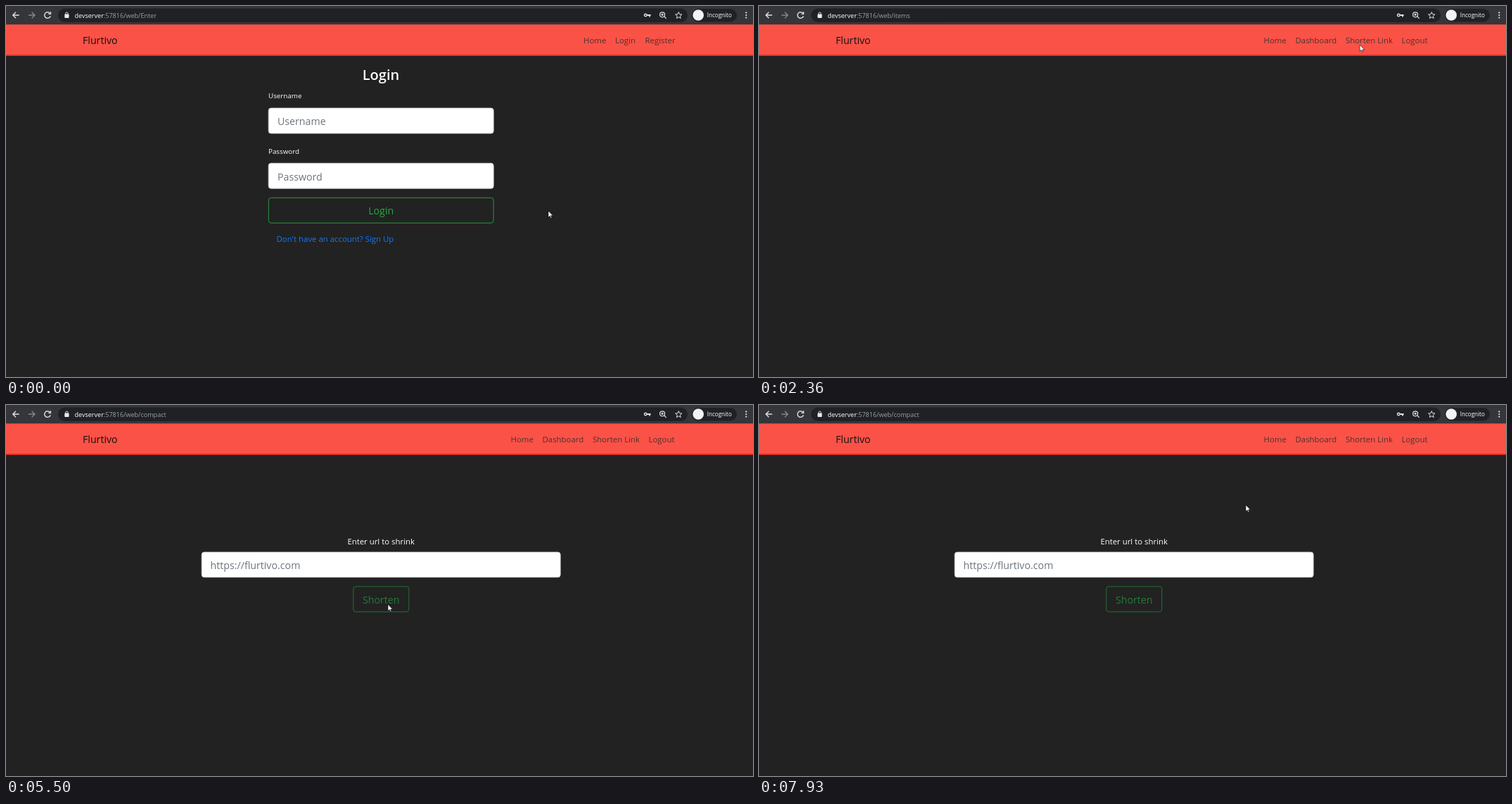
Write an HTML page that moves like this. It is 1062 px wide and 527 px high and loops after 8 s.

```html
<!DOCTYPE html>
<html lang="en">
<head>
<meta charset="utf-8">
<title>Link shortener demo</title>
<style>
  html, body { margin: 0; width: 100%; height: 100%; overflow: hidden; background: #222; }
  svg { display: block; width: 100vw; height: 100vh; }
  text { font: 11.4px "Open Sans", "Noto Sans", sans-serif; fill: #fff; white-space: pre; }
  .large { font-size: 14.2px; }
  .label { font-size: 9.8px; }
  .mid { text-anchor: middle; }
  .nav text { fill: #4b3230; }
  .hint { fill: #6c757d; }
  .field { fill: #fff; stroke: #ced4da; stroke-width: .8; }
  .glow { fill: none; stroke: #007bff; stroke-opacity: .5; stroke-width: 3; }
  .icon { fill: none; stroke: #dfe1e5; stroke-width: 1.4; }
</style>
</head>
<body>
<svg viewBox="0 0 1062 527">
  <rect width="1062" height="527" fill="#222"/>

  <rect y="26" width="1062" height="45" fill="#fb5247"/>
  <rect y="69.3" width="1062" height="1.7" fill="#e32a20"/>
  <text class="large" x="109" y="54" style="fill:#161010">Flurtivo</text>

  <g id="login">
    <g class="nav">
      <text x="821" y="53">Home</text><text x="866" y="53">Login</text><text x="908.5" y="53">Register</text>
    </g>
    <text class="mid" x="533" y="105" style="font-size:20px;font-weight:600">Login</text>
    <text class="label" x="373" y="131">Username</text>
    <text class="label" x="373" y="209.5">Password</text>
    <rect id="userGlow" class="glow" x="372" y="143.5" width="322" height="39" rx="4.5"/>
    <rect class="field" x="373.2" y="145" width="320" height="36" rx="3.6"/>
    <rect class="field" x="373.2" y="223.3" width="320" height="36" rx="3.6"/>
    <g id="emptyForm">
      <text class="large hint" x="386" y="169.3">Username</text>
      <text class="large hint" x="386" y="247.5">Password</text>
    </g>
    <g id="filledForm">
      <rect x="373.5" y="145.3" width="319.4" height="35.4" rx="3.6" fill="#e8f0fe"/>
      <rect x="373.5" y="223.6" width="319.4" height="35.4" rx="3.6" fill="#e8f0fe"/>
      <text class="large" x="386" y="169.3" style="fill:#000">NewGuest</text>
      <path d="M389.3 242.5H433.5" stroke="#000" stroke-width="4.6" stroke-linecap="round" stroke-dasharray="0 6.2"/>
    </g>
    <rect id="loginRing" x="372" y="271.2" width="322.4" height="38" rx="4.5" fill="none" stroke="#28a745" stroke-opacity=".5" stroke-width="3.2"/>
    <rect id="loginButton" x="373.3" y="272.4" width="319.8" height="35.8" rx="3.6" fill="#28a745" stroke="#28a745" stroke-width=".9"/>
    <text id="loginText" class="large mid" x="533.2" y="296">Login</text>
    <text x="384.5" y="334.5" style="fill:#0d7bff">Don't have an account? Sign Up</text>
  </g>

  <g id="memberNav" class="nav">
    <text x="717.5" y="53">Home</text><text x="762.5" y="53">Dashboard</text>
    <text x="834" y="53">Shorten Link</text><text x="913.5" y="53">Logout</text>
  </g>

  <g id="shorten">
    <text class="mid" x="533.2" y="198">Enter url to shrink</text>
    <rect id="urlGlow" class="glow" x="277" y="207.8" width="512.5" height="38" rx="4.5"/>
    <rect class="field" x="278.2" y="209" width="510" height="35.7" rx="3.6"/>
    <text id="urlText" class="large" x="290.5" y="233">https://flurtivo.com</text>
    <path id="caret" d="M291 217V237" stroke="#222" stroke-width=".8"/>
    <g id="shortenButton">
      <rect id="shortenFill" x="493.8" y="257.8" width="79" height="36" rx="3.6" fill="#28a745" stroke="#28a745" stroke-width=".9"/>
      <text id="shortenText" class="large mid" x="533.2" y="282">Shorten</text>
    </g>
  </g>

  <rect id="dim" y="26" width="1062" height="501"/>

  <g id="modal">
    <rect x="342.2" y="49" width="381.8" height="115.5" rx="3.6" fill="#fff"/>
    <path d="M342.2 110.5H724" stroke="#dee2e6" stroke-width=".8"/>
    <text x="355" y="82.8" style="fill:#212529">https://devserver:57816/qkTj</text>
    <circle id="ripple" cx="522.7" cy="79.3" r="18.3" fill="#000"/>
    <path transform="translate(513.5 70.1) scale(.763)" fill="#6b6b6b" d="M16 1H4c-1.1 0-2 .9-2 2v14h2V3h12V1zm-1 4l6 6v10c0 1.1-.9 2-1.99 2H7.99C6.89 23 6 22.1 6 21l.01-14c0-1.1.89-2 1.99-2h7zm-1 7h5.5L14 6.5V12z"/>
    <rect x="662.3" y="123" width="49" height="29.3" rx="3" fill="#007bff"/>
    <text class="mid" x="686.8" y="142.3">Close</text>
  </g>

  <g id="browserBar">
    <rect width="1062" height="26.3" fill="#35363a"/>
    <rect x="74" y="3.5" width="895" height="19.5" rx="9.7" fill="#202124"/>
    <rect x="975" y="4" width="64" height="18.5" rx="9.2" fill="#202124"/>
    <path class="icon" d="M18.7 13H10M14 8.8L9.8 13 14 17.2"/>
    <path class="icon" style="stroke:#85878b" d="M32 13H40.7M36.7 8.8L40.9 13 36.7 17.2"/>
    <path class="icon" d="M62.3 10.2A4.3 4.3 0 1 0 63.2 14.2M63.4 8.3V11.4H60.3"/>
    <rect x="83.3" y="11.6" width="6.2" height="5.4" rx=".8" fill="#e8eaed"/>
    <path class="icon" style="stroke-width:1" d="M84.7 12V10.7A1.7 1.7 0 0 1 88.1 10.7V12"/>
    <text x="97.5" y="16.6" style="font-size:9.05px">devserver<tspan id="address" fill="#9aa0a6"></tspan></text>
    <circle class="icon" cx="909.3" cy="13" r="1.8"/>
    <path class="icon" style="stroke-width:1.8" d="M911.3 13H916.6M915 13V15.4"/>
    <path class="icon" style="stroke-width:1.2" d="M936 15L938.7 17.8M931.3 12.3H934.9M933.1 10.5V14.1"/>
    <circle class="icon" style="stroke-width:1.2" cx="933.1" cy="12.3" r="3.5"/>
    <path class="icon" style="stroke-width:1" d="M956.3 8.6L957.6 11.7 961 12 958.4 14.2 959.2 17.5 956.3 15.8 953.4 17.5 954.2 14.2 951.6 12 955 11.7Z"/>
    <circle cx="984.2" cy="13" r="7.8" fill="#f1f3f4"/>
    <text x="996.7" y="16.2" style="font-size:8.1px">Incognito</text>
    <path d="M1052.3 9.4V17" stroke="#e8eaed" stroke-width="2.1" stroke-linecap="round" stroke-dasharray="0 3.6"/>
  </g>

  <g id="pointer">
    <path id="arrow" d="M0 0V9.3L2.2 7.3 3.6 10.4 5 9.8 3.6 6.8H6.6Z" fill="#fff" stroke="#000" stroke-width=".6"/>
    <path id="beam" d="M-2-4H2M0-4V4M-2 4H2" fill="none" stroke="#333" stroke-width=".9"/>
  </g>
</svg>
<script>
const ui = {};
document.querySelectorAll('[id]').forEach(el => ui[el.id] = el);

const LOOP = 8000;
const DIM_SPANS = [[1100, 1250, 1320, 1470], [4430, 4580, 5350, 5500], [5650, 5800, 7800, 7930]];
// time, x, y
const POINTER = [
  [80, 771, 291], [330, 520, 165], [520, 520, 165], [860, 494, 283],
  [1730, 494, 283], [2440, 867, 47], [2600, 867, 47], [2990, 548, 234.5],
  [3910, 548, 234.5], [4200, 545, 292], [4310, 543, 286], [5800, 543, 283],
  [6280, 538, 93], [6430, 538, 93], [6590, 522, 82], [6980, 522, 82], [7380, 692, 142]
];

const ramp = (t, a, b) => Math.min(1, Math.max(0, (t - a) / (b - a)));
const pulse = (t, [a, b, c, d]) => ramp(t, a, b) - ramp(t, c, d);
const within = (t, a, b) => t >= a && t < b;
const fade = (el, value) => el.setAttribute('opacity', value);
const show = (el, on) => el.style.display = on ? '' : 'none';

function pointerAt(t) {
  const next = POINTER.findIndex(p => p[0] > t);
  if (next < 0) return POINTER.at(-1).slice(1);
  if (next === 0) return POINTER[0].slice(1);
  const [a, ax, ay] = POINTER[next - 1], [b, bx, by] = POINTER[next];
  const k = ramp(t, a, b), e = k * k * (3 - 2 * k);
  return [ax + (bx - ax) * e, ay + (by - ay) * e];
}

function draw(t) {
  const onLogin = t < 1480, onShorten = t >= 2440;
  show(ui.login, onLogin);
  show(ui.memberNav, !onLogin);
  show(ui.shorten, onShorten);
  ui.address.textContent = ':57816/web/' + (t < 1340 ? 'Enter' : onShorten ? 'compact' : 'items');

  const filled = t >= 520, hover = ramp(t, 760, 900);
  show(ui.emptyForm, !filled);
  show(ui.filledForm, filled);
  fade(ui.userGlow, pulse(t, [330, 480, 860, 1000]));
  fade(ui.loginRing, ramp(t, 940, 1090));
  ui.loginButton.setAttribute('fill-opacity', hover);
  ui.loginText.style.fill = hover > .5 ? '#fff' : '#28a745';

  const pasted = within(t, 3600, 4390);
  const shortenHover = pulse(t, [4150, 4300, 4430, 4580]);
  fade(ui.urlGlow, pulse(t, [3140, 3290, 4310, 4460]));
  show(ui.caret, within(t, 3140, 3450));
  ui.urlText.style.fill = pasted ? '#495057' : '#6c757d';
  fade(ui.shortenButton, pasted ? 1 : .65);
  ui.shortenFill.setAttribute('fill-opacity', shortenHover);
  ui.shortenText.style.fill = shortenHover > .5 ? '#fff' : '#28a745';

  fade(ui.dim, .5 * Math.max(...DIM_SPANS.map(span => pulse(t, span))));

  const lift = 38 * (1 - ramp(t, 5800, 6100)) ** 2;
  fade(ui.modal, pulse(t, [5800, 5950, 7800, 7870]));
  ui.modal.setAttribute('transform', `translate(0 ${-lift})`);
  fade(ui.ripple, .12 * pulse(t, [6800, 6840, 6980, 7130]));

  const [x, y] = pointerAt(t);
  const overText = onLogin ? x < 693 && within(y, 145, 181) || x < 693 && within(y, 223, 260)
    : t < 5000 && onShorten && x < 788 && within(y, 209, 245);
  show(ui.arrow, !overText);
  show(ui.beam, overText);
  ui.pointer.setAttribute('transform', `translate(${x} ${y})`);
}

function tick() {
  draw(performance.now() % LOOP);
  requestAnimationFrame(tick);
}
tick();
</script>
</body>
</html>
```
